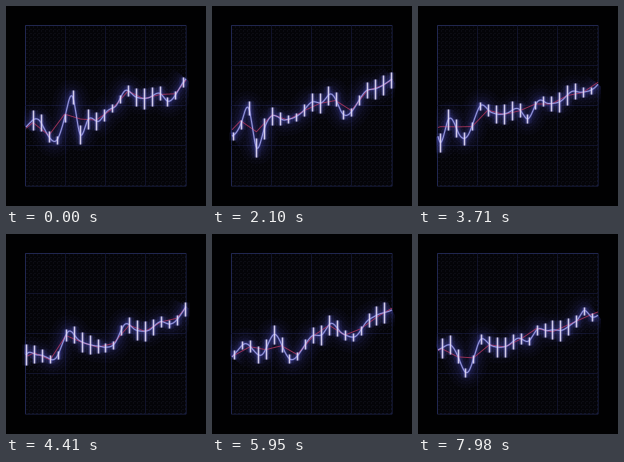
Recreate the animation shown at these times as a matplotlib script. Size 200 by 200 pixels, loop 8 s.

```python
import numpy as np
import matplotlib.pyplot as plt
from matplotlib.animation import FuncAnimation
from matplotlib.collections import LineCollection
from matplotlib.patches import Rectangle

SIZE, DPI = 200, 100
PX = 72 / DPI
LOOP, TICK, STEP = 8000, 20, 70
GAP, X0 = 7.91, 27.0
LEFT, RIGHT = 20, 180

# Price trend, fixed to the stage: (x, y)
TREND = [(10, 130), (23, 123), (32, 117), (50, 129.5), (63, 106), (73, 115),
         (89, 115), (100, 105), (110, 104.5), (119, 92.5), (130, 100),
         (142, 99.5), (155, 87.5), (162, 87), (190, 66)]

# Swings around the trend that scroll with the candles: (candle, offset)
SWINGS = [(-2, 2), (0, -6), (2, 4), (4, 0), (5, -17), (6, 13), (7, -4),
          (8.5, 4), (10, -3), (13, -9), (16, -1), (17, 8), (19, -1), (24, 0),
          (25.5, 4), (28, -5), (31, 0), (32, -9), (33, 3), (36, 0)]


def smooth(x, points):
    """Cubic Hermite curve through the given points."""
    xs, ys = np.array(points, float).T
    slope = np.gradient(ys, xs)
    j = np.clip(np.searchsorted(xs, x) - 1, 0, len(xs) - 2)
    h = xs[j + 1] - xs[j]
    u = np.clip((x - xs[j]) / h, 0, 1)
    return ((1 + 2 * u) * (1 - u) ** 2 * ys[j] + u * (1 - u) ** 2 * h * slope[j]
            + u * u * (3 - 2 * u) * ys[j + 1] + u * u * (u - 1) * h * slope[j + 1])


def trend(x):
    return smooth(x, TREND)


def swing(n):
    return smooth(n, SWINGS)


IDS = np.arange(-2, 36)
OFFSET = swing(IDS)
LENGTH = 14 + 6.5 * np.cos(2 * np.pi * (IDS - 14.2) / 7.3)
EVEN = IDS[IDS % 2 == 0]
MEAN = (swing(EVEN - 1) + swing(EVEN) + swing(EVEN + 1)) / 3

fig = plt.figure(figsize=(SIZE / DPI, SIZE / DPI), dpi=DPI, facecolor="#010102")
ax = fig.add_axes([0, 0, 1, 1])
ax.set_xlim(0, SIZE)
ax.set_ylim(SIZE, 0)
ax.axis("off")


def grid(places, **style):
    for p in places:
        ax.plot([LEFT, RIGHT], [p, p], snap=False, **style)
        ax.plot([p, p], [LEFT, RIGHT], snap=False, **style)


ax.add_patch(Rectangle((19.5, 19.5), 160.5, 160.5, fc="#040408", ec="none"))
grid(np.arange(23.5, 180, 4), color="#0c0c13", lw=PX, linestyle=(0, (2, 2)))
grid((59.5, 99.5, 139.5), color="#11132a", lw=PX)
ax.add_patch(Rectangle((19.5, 19.5), 160.5, 160.5, fc="none", ec="#20264f",
                       lw=PX, snap=False))

clip = Rectangle((18, 18), 165, 164, transform=ax.transData)


def line(color, width, alpha):
    art, = ax.plot([], [], color=color, lw=width * PX, alpha=alpha,
                   solid_capstyle="butt", solid_joinstyle="round")
    art.set_clip_path(clip)
    return art


def bars(color, width, alpha):
    art = LineCollection([], colors=color, linewidths=width * PX, alpha=alpha)
    art.set_clip_path(clip)
    ax.add_collection(art)
    return art


# Glow first, then the bright cores
curves = [line("#4648b4", w, a) for w, a in
          ((32, 0.04), (24, 0.05), (17, 0.07), (11, 0.09), (6.5, 0.13))]
wicks = [bars("#5c60cc", w, a) for w, a in ((9, 0.08), (5, 0.16))]
curves.append(line("#6468e0", 2.2, 0.4))
mean = line("#c03a62", 1.0, 0.75)
curves.append(line("#b4b4f2", 1.0, 0.8))
wicks.append(bars("#8c88dc", 2.6, 0.35))
wicks.append(bars("#e8e0f8", 1.4, 0.88))

XS = np.linspace(LEFT, RIGHT, 400)


def update(i):
    scroll = i * TICK // STEP

    ys = trend(XS) + swing((XS + scroll - X0) / GAP)
    for c in curves:
        c.set_data(XS, ys)

    x = X0 + GAP * IDS - scroll
    mid = trend(x) + OFFSET
    segs = [[(a, m - n / 2), (a, m + n / 2)]
            for a, m, n in zip(x, mid, LENGTH) if LEFT <= a <= RIGHT]
    for w in wicks:
        w.set_segments(segs)

    ex = X0 + GAP * EVEN - scroll
    mean.set_data(XS, np.interp(XS, ex, trend(ex) + MEAN))
    return curves + wicks + [mean]


anim = FuncAnimation(fig, update, frames=LOOP // TICK, interval=TICK,
                     repeat=True, repeat_delay=0, blit=False)
plt.show()
```
